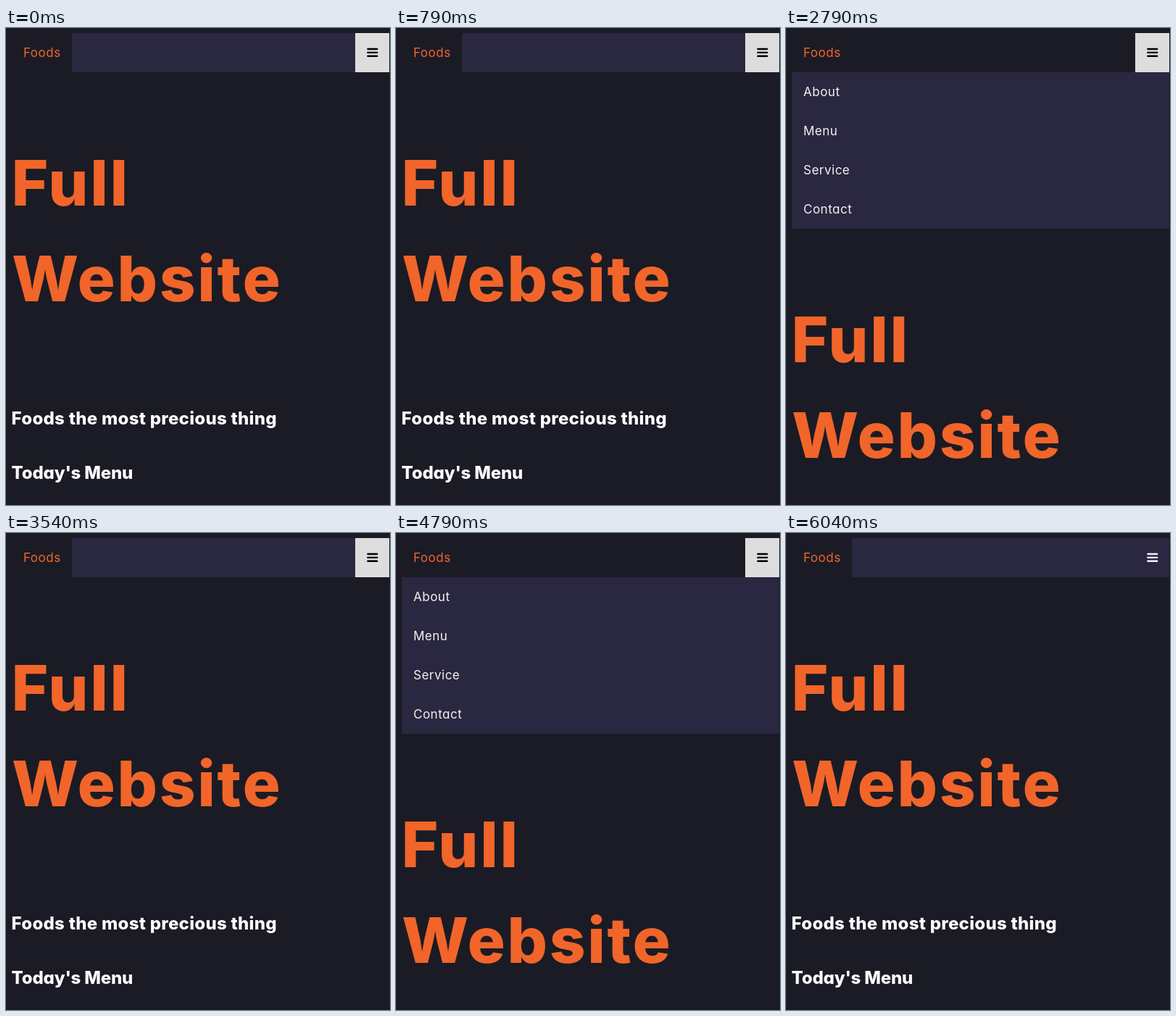
These frames come from a looping animation (530 by 658 pixels, 7.8 s). An HTML page:

```html
<!DOCTYPE html>
<html lang="en">
<head>
<meta charset="utf-8">
<title>Foods</title>
<style>
  html, body { margin: 0; width: 100%; height: 100%; overflow: hidden; background: #1b1b25; }
  svg { display: block; width: 100vw; height: 100vh; }
  text { font-family: Inter, "Open Sans", sans-serif; font-feature-settings: "cv11"; }
  .nav { font-size: 17px; letter-spacing: .5px; fill: #f2f2f2; }
  .hero { font-size: 87px; font-weight: 800; letter-spacing: 2.7px; }
  .sub { font-size: 24px; font-weight: 800; letter-spacing: .28px; fill: #fff; }
  .sub.tight { letter-spacing: -.15px; }
  .nav.brand, .hero { fill: #f1652a; }
</style>
</head>
<body>
<svg viewBox="0 0 530 658">
  <rect width="530" height="658" fill="#1b1b25"/>
  <rect id="bar" fill="#2a2740"/>
  <text class="nav brand" x="24" y="40">Foods</text>
  <g id="links">
    <text class="nav" x="24" y="94">About</text>
    <text class="nav" x="24" y="148">Menu</text>
    <text class="nav" x="24" y="202">Service</text>
    <text class="nav" x="24" y="256">Contact</text>
  </g>
  <rect id="button" x="482" y="7" width="47" height="54" fill="#ddd"/>
  <g id="icon">
    <rect x="498.4" y="27.8" width="14.8" height="2.4" rx=".6"/>
    <rect x="498.4" y="32.7" width="14.8" height="2.4" rx=".6"/>
    <rect x="498.4" y="37.6" width="14.8" height="2.4" rx=".6"/>
  </g>
  <g id="page">
    <text class="hero" x="7.5" y="245">Full</text>
    <text class="hero" x="8" y="377">Website</text>
    <text class="sub" x="7.5" y="547">Foods the most precious thing</text>
    <text class="sub tight" x="7.5" y="622">Today's Menu</text>
  </g>
</svg>
<script>
  const LOOP = 7800;
  const OPEN = [[1830, 3540], [4330, 5200]];
  const HOVER_END = 6040;
  const MENU_HEIGHT = 216;

  const el = id => document.getElementById(id);
  const set = (id, attrs) => {
    for (const name in attrs) el(id).setAttribute(name, attrs[name]);
  };
  const show = (id, on) => set(id, { visibility: on ? "visible" : "hidden" });

  function render(t) {
    const open = OPEN.some(([from, to]) => t >= from && t < to);
    const hover = t < HOVER_END;
    set("bar", open
      ? { x: 8, y: 61, width: 521, height: MENU_HEIGHT }
      : { x: 91, y: 7, width: 438, height: 54 });
    show("links", open);
    show("button", hover);
    set("icon", { fill: hover ? "#000" : "#f2f2f2" });
    set("page", { transform: `translate(0 ${open ? MENU_HEIGHT : 0})` });
  }

  const start = performance.now();
  function tick() {
    render((performance.now() - start) % LOOP);
    requestAnimationFrame(tick);
  }
  tick();
</script>
</body>
</html>
```
